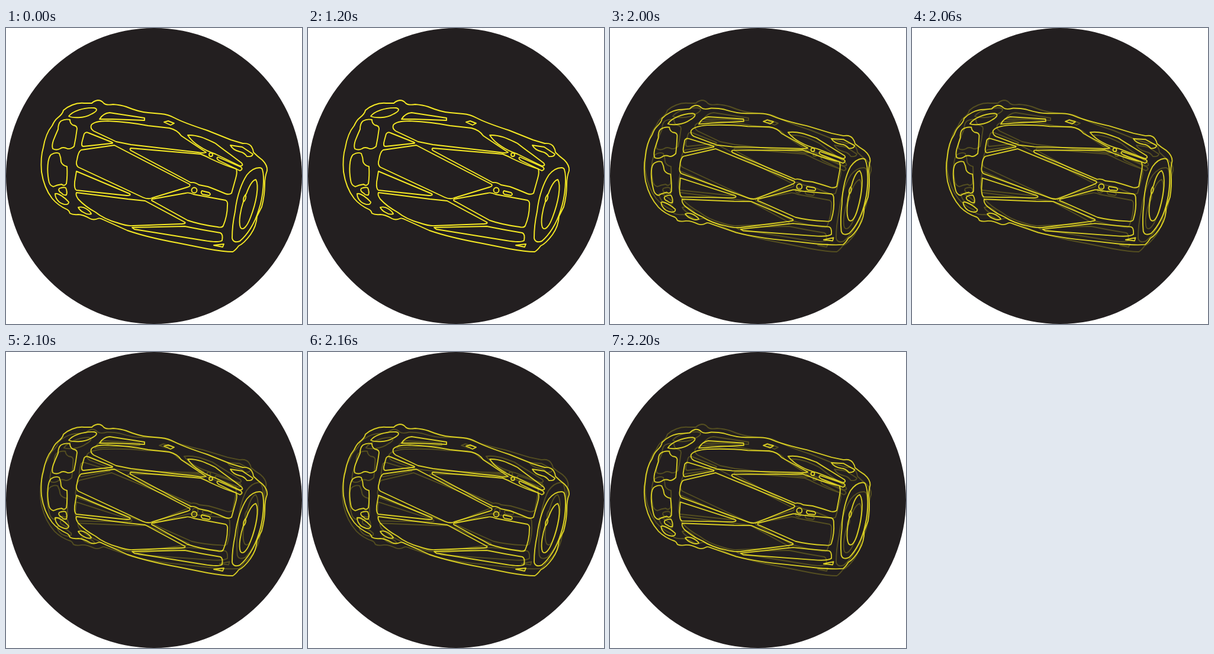
An HTML page that plays this animation: 500 by 500 pixels, repeating every 2.3 s.

```html
<!DOCTYPE html>
<html lang="en">
<head>
<meta charset="utf-8">
<title>Shaking drum</title>
<style>
  html, body { margin: 0; width: 100%; height: 100%; overflow: hidden; background: #fff; }
  svg { display: block; width: 100vw; height: 100vh; }
  #drum { fill: none; stroke: #f6ea24; stroke-width: 1.9; stroke-linejoin: round; stroke-linecap: round; }
</style>
</head>
<body>
<svg viewBox="0 0 500 500">
  <defs>
    <g id="drum">
      <!-- silhouette -->
      <path d="M145 127Q149 123 155 122Q161 122 165 127Q169 131 181 129Q194 130 203 133Q225 142 240 143L262 145Q274 146 285 152Q300 160 340 173L380 189L400 195Q411 194 415 201Q418 206 418 210Q425 217 433 223Q442 232 441 241Q437 252 437 264Q437 283 432 302Q426 314 424 318Q423 335 413 349Q402 364 393 368Q388 375 383 378Q368 378 340 373L290 363Q240 354 205 342L165 324Q158 320 155 322Q148 325 142 322Q130 315 122 315Q113 316 108 313Q107 309 104 307Q88 300 78 288Q64 270 60 243Q58 218 63 202Q67 178 78 165Q82 156 87 152Q96 145 97 139Q104 133 112 130Q122 126 132 127Z"/>
      <!-- rim openings -->
      <path d="M106 149C112 141 130 134 149 135C157 137 152 142 143 146C132 153 112 152 106 149Z"/>
      <path d="M93 157Q100 153 108 155Q108 161 113 164Q120 165 120 170Q118 186 115 200Q109 205 104 204Q96 200 91 204Q85 207 79 204Q77 199 80 190Q84 180 88 171Q88 161 93 157Z"/>
      <path d="M76 214Q84 209 90 212Q93 219 93 226Q95 232 103 234Q104 250 102 263Q98 268 94 264Q86 265 80 268Q73 266 72 257C69 240 70 220 76 214Z"/>
      <path d="M90 271Q97 268 101 270Q104 277 102 282Q97 283 94 279Q87 275 90 271Z"/>
      <path d="M83 280C88 278 100 287 106 294C106 300 97 299 90 294Q83 288 83 280Z"/>
      <path d="M122 303Q129 301 135 305Q143 310 144 314Q138 316 132 312Q125 309 122 303Z"/>
      <!-- skin panels between the ropes -->
      <path d="M158 154Q164 144 175 143L234 152V156L180 154Z"/>
      <path d="M144 164Q149 157 172 157Q210 159 240 165L276 169Q289 172 296 182L338 210Q334 212 324 210L211 197L186 192L148 174Q142 170 144 164Z"/>
      <path d="M132 179Q135 175 139 177L179 193Q182 195 177 195L131 200Q126 200 129 190Z"/>
      <path d="M211 203L329 213Q339 217 346 221Q369 232 389 238Q391 244 388 254L381 279Q377 282 371 280Q352 272 341 268L326 265Q319 260 312 261L211 207Q208 204 211 203Z"/>
      <path d="M127 206L183 198L310 264Q313 267 306 269L247 287Q240 290 231 286L122 235Q117 231 120 222Q122 209 127 206Z"/>
      <path d="M119 242L209 280Q212 283 204 283L119 274Q115 272 116 260Z"/>
      <path d="M119 278L206 289L235 292L302 328Q305 331 294 331L215 334Q205 335 188 329Q166 323 151 311Q134 302 122 289Q117 282 119 278Z"/>
      <path d="M247 289L303 279Q309 277 317 281L333 284L371 291Q375 293 374 300Q374 317 367 334Q365 338 357 336Q327 332 307 325L249 293Q244 291 247 289Z"/>
      <path d="M213 337L302 335Q331 341 362 346Q367 348 365 359Q359 363 335 359Q291 352 217 340Z"/>
      <path d="M351 367L368 365L366 370Z"/>
      <!-- rope fittings and upper openings -->
      <circle cx="318" cy="274" r="4.5"/>
      <circle cx="346" cy="214" r="3"/>
      <path d="M331 275L343 278Q347 281 343 283L332 281Q328 278 331 275Z"/>
      <path d="M267 159L274 157L284 161L278 164Z"/>
      <path d="M307 181C326 180 343 190 354 195Q364 203 378 213L398 228Q402 233 395 233L354 213Q337 207 327 200Q314 192 307 181Z"/>
      <path d="M358 218L397 235Q401 239 395 241L360 224Q354 220 358 218Z"/>
      <path d="M379 198L399 201L417 213Q416 218 407 217Q402 210 395 209Q383 206 379 198Z"/>
      <!-- drum head -->
      <path d="M433 239C437 251 435 284 427 307C420 331 407 350 395 360Q384 364 382 355Q382 333 387 310C390 282 399 260 407 248Q417 236 428 236Q432 236 433 239Z"/>
      <path d="M422 256C428 266 423 294 413 320C407 336 400 343 396 337C392 327 397 305 401 293Q400 286 406 280C411 266 417 257 422 256Z"/>
      <path d="M405 283Q406 288 402 293"/>
    </g>
  </defs>
  <circle cx="250" cy="250" r="250" fill="#231f20"/>
  <use id="ghost" href="#drum"/>
  <use id="main" href="#drum"/>
</svg>
<script>
  const LOOP = 2300, REST = 2000, STEP = 100;
  const main = document.getElementById('main');
  const ghost = document.getElementById('ghost');
  const start = performance.now();

  function pose(layer, turned, opacity) {
    layer.setAttribute('transform', `rotate(${turned ? -5 : 0} 250 250)`);
    layer.setAttribute('opacity', opacity);
  }

  function draw() {
    const t = (performance.now() - start) % LOOP;
    const shaking = t >= REST;
    const turned = shaking && Math.floor((t - REST) / STEP) % 2 === 0;
    pose(main, turned, shaking ? 0.85 : 1);
    pose(ghost, !turned, shaking ? 0.23 : 0);
    requestAnimationFrame(draw);
  }

  draw();
</script>
</body>
</html>
```
